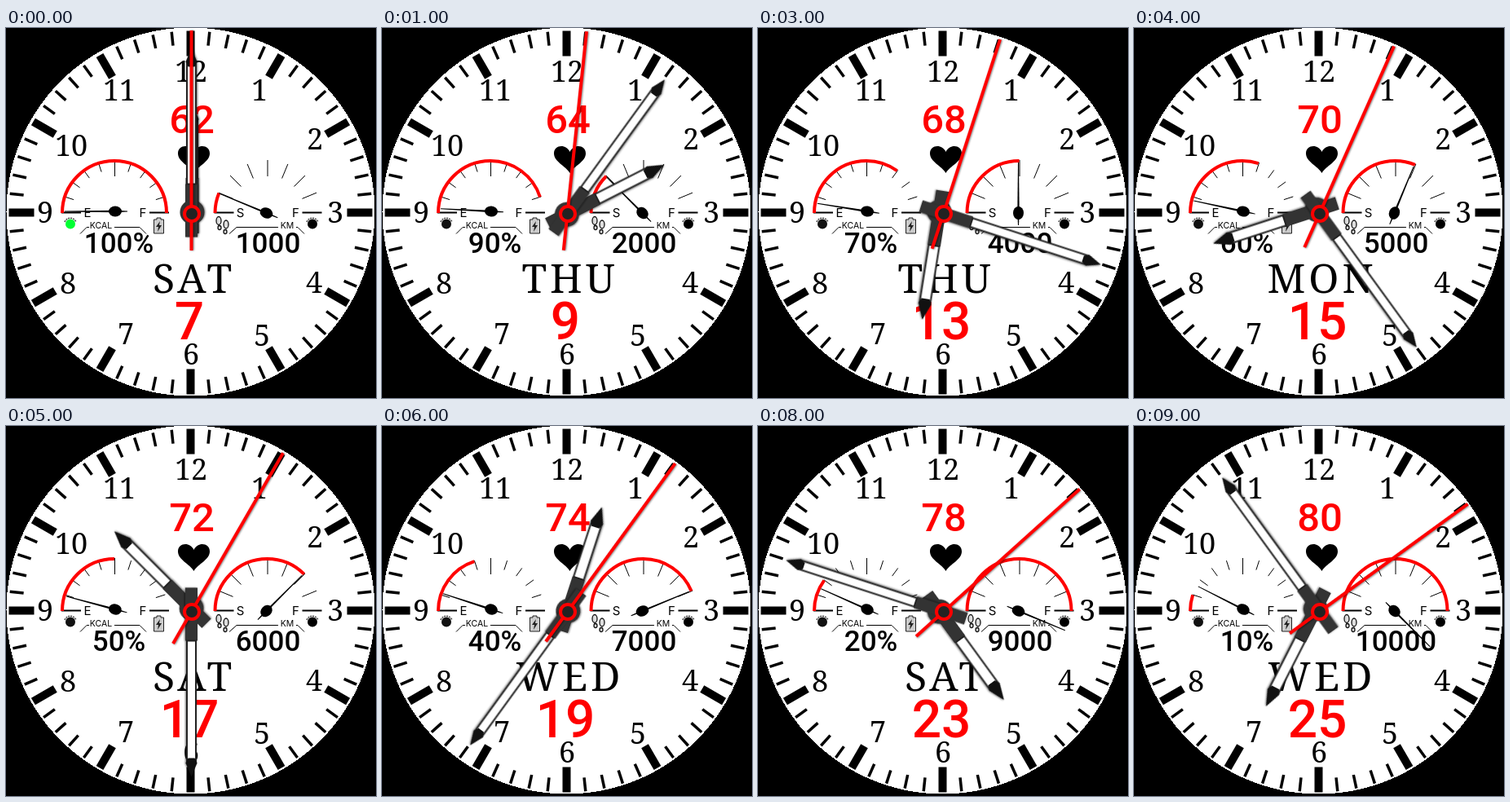
Recreate the animation shown at these times as an HTML page. Size 454 by 454 pixels, loop 10000 ms.

```html
<!DOCTYPE html>
<html lang="en">
<head>
<meta charset="utf-8">
<title>Analog watch face</title>
<style>
  html, body { margin: 0; width: 100%; height: 100%; overflow: hidden; background: #000; }
  svg { display: block; width: 100%; height: 100%; }
  text { text-anchor: middle; }
  .numeral { font: 500 36px "Noto Serif", serif; }
  .weekday { font: 500 50px "Noto Serif", serif; letter-spacing: 4px; }
  .readout { font-family: Roboto, sans-serif; font-weight: 500; }
  .label { font: 15px Inter, sans-serif; }
  .unit { font: 10.5px Inter, sans-serif; }
  .red { fill: #f00; }
  .line { fill: none; stroke: #000; }
  .arc { fill: none; stroke: #f00; stroke-width: 4; }
  .hand { filter: drop-shadow(1.5px 0 1px #0008); }
</style>
</head>
<body>
<svg viewBox="0 0 454 454">
  <circle cx="226.5" cy="225.5" r="226" fill="#fff" shape-rendering="crispEdges"/>
  <g id="dial"></g>
  <path d="M230.500 178C225 169 211 164 211 154C211 143 226 142 230.500 152C235 142 250 143 250 154C250 164 236 169 230.500 178Z"/>
  <g id="gauges"></g>

  <path class="line" d="M91 252.500L99 244.500H102M133 244.500H164L172 252.500M274 252.500L283 244.500H334M356 244.500H358L366 252.500"/>
  <text class="unit" x="116.500" y="246">KCAL</text>
  <text class="unit" x="345" y="246">KM</text>

  <g>
    <circle id="lamp" cx="79" cy="240.500" r="6"/>
    <circle cx="376" cy="240.500" r="6"/>
    <path d="M72 238a7.500 7.500 0 0 1 14 0M369 238a7.500 7.500 0 0 1 14 0" fill="none" stroke="#444" stroke-width="1.500" stroke-dasharray="2 1"/>
  </g>
  <g stroke="#222">
    <path d="M185 233h5v2h3.500v17h-12v-17h3.500z" fill="#ccc"/>
    <path d="M189 237l-5 7h3l-1 6 5-8h-3z" fill="#222" stroke="none"/>
  </g>
  <g fill="#ddd" stroke="#111" stroke-width="1.300">
    <ellipse cx="261" cy="236.500" rx="3" ry="5"/><ellipse cx="262" cy="245" rx="2" ry="2.500"/>
    <ellipse cx="270" cy="241" rx="3" ry="5"/><ellipse cx="269" cy="250" rx="2" ry="2.500"/>
  </g>

  <text id="pulse" class="readout red" x="228" y="129" font-size="49"></text>
  <text id="battery" class="readout" x="138.500" y="276" font-size="35"></text>
  <text id="steps" class="readout" x="321.500" y="276" font-size="35"></text>
  <text id="weekday" class="weekday" x="230.500" y="325"></text>
  <text id="date" class="readout red" x="225" y="382" font-size="64"></text>

  <g id="hour" class="hand"><g transform="translate(3)">
    <path d="M-8 26V-42H8V26Z" fill="#333"/>
    <circle r="15" fill="#333"/>
    <path d="M-6.500-42V-112H6.500V-42Z" fill="#fff" stroke="#222" stroke-width="2"/>
    <path d="M-8-114L0-134L8-114L5-108H-5Z" fill="#111"/>
  </g></g>
  <g id="minute" class="hand">
    <path d="M-7.500 29V-36H7.500V29Z" fill="#333"/>
    <path d="M-5.500-36V-185H5.500V-36Z" fill="#fff" stroke="#222" stroke-width="2"/>
    <path d="M-7-186L0-203L7-186L4-180H-4Z" fill="#111"/>
  </g>
  <path id="second" class="hand" d="M-2 45V-225H2V45Z" fill="#f00"/>
  <circle cx="228" cy="228" r="9" fill="#222" stroke="#f00" stroke-width="4"/>
</svg>
<script>
const $ = id => document.getElementById(id);
const rad = deg => deg * Math.PI / 180;

// Radial line; angle is measured clockwise from 12 o'clock.
const ray = (cx, cy, angle, inner, outer, width) => {
  const x = Math.sin(rad(angle)), y = -Math.cos(rad(angle));
  return `<line x1="${cx + x * inner}" y1="${cy + y * inner}" x2="${cx + x * outer}"
    y2="${cy + y * outer}" stroke="#000" stroke-width="${width}"/>`;
};

const numerals = [[227, 53], [311, 76], [379, 136], [404, 226], [378, 312], [314, 377],
  [227, 400], [147, 375], [76, 313], [48, 226], [80, 144], [139, 76]];
let dial = '';
for (let i = 0; i < 60; i++) {
  const isHour = i % 5 === 0;
  dial += ray(226.5, 226.5, i * 6, isHour ? 192 : 206, 223, isHour ? 10 : 3.5);
}
numerals.forEach(([x, y], i) => {
  dial += `<text class="numeral" x="${x}" y="${y + 13}">${i || 12}</text>`;
});
$('dial').innerHTML = dial;

function gauge(name, cx, divisions, inner, start) {
  let ticks = '';
  for (let i = 1; i < divisions; i++) {
    const angle = i * 180 / divisions - 90;
    ticks += ray(cx + 0.5, 227, angle, angle ? inner : 45, 65, 1);
  }
  return `${ticks}
    <path class="line" stroke-width="2" d="M${cx - 65} 226.5h24M${cx + 43} 226.5h24"/>
    <text class="label" x="${cx - 33}" y="232">${start}</text>
    <text class="label" x="${cx + 35}" y="232">F</text>
    <path id="${name}Arc" class="arc" pathLength="100" d="M${cx - 64} 227a64 64 0 0 1 128 0"/>
    <g id="${name}Needle">
      <path d="M-62-.5L0-1.200L15-.5V.5L0 1.200L-62 .5Z"/>
      <ellipse rx="8" ry="6.500"/>
    </g>`;
}
$('gauges').innerHTML = gauge('battery', 133, 10, 53, 'E') + gauge('steps', 320.5, 8, 46, 'S');

const place = (id, x, y, angle) =>
  $(id).setAttribute('transform', `translate(${x} ${y}) rotate(${angle})`);
const fillArc = (id, percent) => $(id).setAttribute('stroke-dasharray', `${percent} 200`);
const days = ['SUN', 'MON', 'TUE', 'WED', 'THU', 'FRI', 'SAT'];

function show(step) {
  const battery = 100 - step * 10;
  const steps = (step + 1) * 1000;
  // Each step moves one month and two days ahead.
  const date = new Date(Date.UTC(2023, step, 7 + step * 2));

  $('pulse').textContent = 62 + step * 2;
  $('battery').textContent = battery + '%';
  $('steps').textContent = steps;
  $('weekday').textContent = days[date.getUTCDay()];
  $('date').textContent = date.getUTCDate();
  $('lamp').setAttribute('fill', battery === 100 ? '#0f3' : '#111');

  fillArc('batteryArc', battery);
  fillArc('stepsArc', Math.min(100, steps / 80));
  place('batteryNeedle', 134, 225, step * 3);
  place('stepsNeedle', 319.5, 227, steps / 8000 * 180);

  place('hour', 225.5, 226, step * 63);
  place('minute', 227.5, 227.5, step * 36);
  place('second', 227.5, 228, step * 6);
}

let shown = -1;
const startTime = performance.now();
function tick() {
  const step = Math.floor((performance.now() - startTime) / 1000) % 10;
  if (step !== shown) show(shown = step);
  requestAnimationFrame(tick);
}
tick();
</script>
</body>
</html>
```
